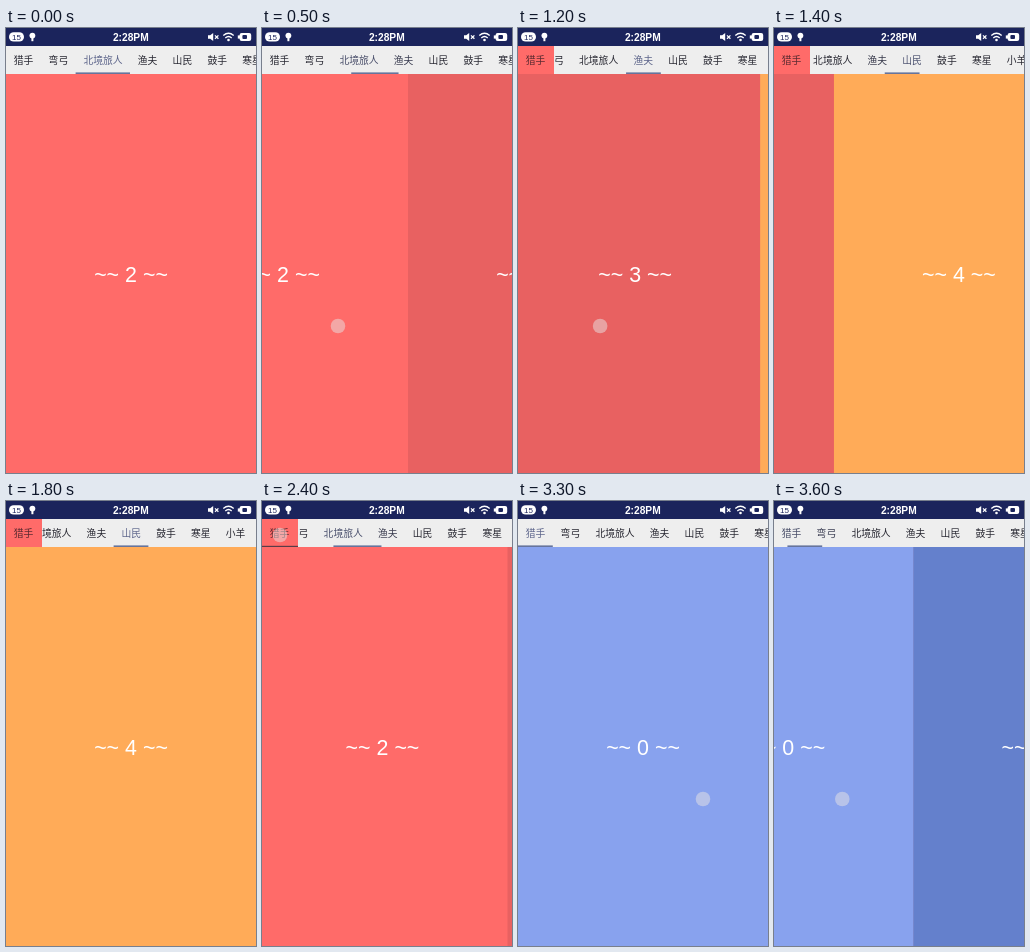
Animation of 250x445 px, one loop 3.7 s. Source, as an HTML page:

```html
<!DOCTYPE html>
<html lang="zh">
<head>
<meta charset="utf-8">
<title>Pinned tabs</title>
<style>
  html, body { margin: 0; width: 100%; height: 100%; overflow: hidden; background: #ff6b69; }
  svg { display: block; width: 100%; height: 100%; }
  text { text-anchor: middle; }
  .tab { font: 9.8px "Noto Sans CJK SC", "Noto Sans CJK", sans-serif; }
  .page { font: 21.4px "Liberation Sans", sans-serif; fill: #fff; }
  .clock { font: bold 10.2px "Liberation Sans", sans-serif; fill: #fff; }
  .badge { font: 8px "Liberation Sans", sans-serif; fill: #1b245c; }
  .line { fill: none; stroke: #fff; stroke-width: 1.3; }
</style>
</head>
<body>
<svg viewBox="0 0 250 445" preserveAspectRatio="none">
  <g id="pages"></g>
  <rect y="18" width="250" height="28" fill="#eee"/>
  <g id="strip"><rect id="bar" y="44.4" height="1.6" fill="#66749c"/></g>
  <g id="pin">
    <rect y="18" width="36" height="28" fill="#ff6b69"/>
    <text class="tab" x="17.6" y="35.6" fill="#5a2a30"></text>
    <rect id="press" y="44.8" width="36" height="1.2" fill="#5a3c48"/>
  </g>
  <rect width="250" height="18" fill="#1b245c"/>
  <rect x="3" y="4.2" width="15" height="9.4" rx="4.7" fill="#fff"/>
  <text class="badge" x="10.5" y="11.8">15</text>
  <circle cx="26.4" cy="7.6" r="2.9" fill="#fff"/>
  <path d="M25.4 9.6h2v3.6h-2z" fill="#fff"/>
  <text class="clock" x="124.8" y="12.7">2:28PM</text>
  <path d="M202 7.3h2.2l3-2.4v8.2l-3-2.4h-2.2z" fill="#fff"/>
  <path class="line" d="M209 7.4l3.4 3.4m0-3.4l-3.4 3.4"/>
  <path class="line" d="M217.3 7.6q5.2-4.6 10.4 0M219.3 9.9q3.2-2.8 6.4 0"/>
  <circle cx="222.5" cy="12" r="1.3" fill="#fff"/>
  <rect x="233.6" y="5" width="11.6" height="8" rx="2" fill="#fff"/>
  <path d="M231.8 7.4h3v3.2h-3z" fill="#fff"/>
  <rect x="236.4" y="7" width="4.6" height="4" rx="1" fill="#1b245c"/>
  <circle id="dot" r="7.3" fill="#e8e4e4" opacity=".5"/>
</svg>
<script>
const LOOP = 3700, STEP = 100, W = 250;
const REST = 94, SLOP = 6, FLING = 500;
const names = ["猎手", "弯弓", "北境旅人", "渔夫", "山民", "鼓手", "寒星", "小羊"];
const colors = ["#88a2ee", "#6480cc", "#ff6b69", "#e86161", "#ffab58"];

const swipes = [
  { down: 206, hold: 320, page: 2, x: 186 },
  { down: 1035, hold: 271, page: 3, x: 96 },
  { down: 3300, hold: 400, page: 0, x: 185 }
];
const tap = { down: 2280, hold: 160, x: 18, y: 34 };
const jump = { at: 2333.5, time: 520, from: 4 };

const $ = id => document.getElementById(id);
const lerp = (a, b, k) => a + (b - a) * k;
const easeOut = k => 1 - (1 - Math.min(1, k)) ** 5;
const isDown = (g, t) => t >= g.down && t < g.down + g.hold;
const show = (el, on) => { el.style.display = on ? "" : "none"; };

function add(parent, tag, attrs, text) {
  const el = document.createElementNS("http://www.w3.org/2000/svg", tag);
  for (const k in attrs) el.setAttribute(k, attrs[k]);
  if (text) el.textContent = text;
  return parent.appendChild(el);
}

// The finger rests briefly, then speeds up to the left
const travel = (s, t) => 110 * (Math.max(0, t - s.down - REST) / 200) ** 2;

// Pages follow the finger past the slop, then fling to the next one
function position(t) {
  const s = swipes.findLast(s => t >= s.down);
  if (!s) return swipes[0].page;
  if (t >= jump.at && s.down < jump.at)
    return jump.from * (1 - easeOut((t - jump.at) / jump.time));
  const up = s.down + s.hold;
  const drag = Math.max(0, travel(s, Math.min(t, up)) - SLOP) / W;
  return s.page + (t < up ? drag : lerp(drag, 1, easeOut((t - up) / FLING)));
}

function finger(t) {
  if (isDown(tap, t)) return [tap.x, tap.y];
  const s = swipes.find(s => isDown(s, t));
  return s && [s.x - travel(s, t), 298];
}

let edge = 0;
const tabs = names.map(name => {
  const w = name.length * 9.8 + 15.2, x = edge;
  edge += w;
  const el = add($("strip"), "text", { class: "tab", x: x + w / 2 + .2, y: 35.6 }, name);
  return { x, w, el };
});
$("pin").querySelector("text").textContent = names[0];

const pages = colors.map((fill, i) => {
  const g = add($("pages"), "g", {});
  add(g, "rect", { y: 46, width: W + .5, height: 399, fill });
  add(g, "text", { class: "page", x: 125, y: 254 }, `~~ ${i} ~~`);
  return g;
});

// Left edge and width of the tab at a fractional position
function span(p) {
  const i = Math.floor(p), a = tabs[i], b = tabs[i + 1];
  return [lerp(a.x, b.x, p - i), lerp(a.w, b.w, p - i)];
}

function draw(t) {
  const p = position(t);
  pages.forEach((g, i) => g.setAttribute("transform", `translate(${(i - p) * W})`));

  // The underline and the tab strip trail the pages slightly
  const q = position(t - 13), [x, w] = span(q);
  $("bar").setAttribute("x", x);
  $("bar").setAttribute("width", w);
  tabs.forEach((tab, i) => {
    const k = Math.max(0, 1 - Math.abs(i - q));
    tab.el.setAttribute("fill", `rgb(${lerp(38, 92, k)},${lerp(38, 100, k)},${lerp(48, 138, k)})`);
  });

  const [sx, sw] = span(position(t - 37));
  const scroll = Math.max(0, sx + sw / 2 - W / 2);
  $("strip").setAttribute("transform", `translate(${-scroll})`);
  show($("pin"), scroll > .3);
  show($("press"), isDown(tap, t));

  const at = finger(t);
  show($("dot"), at);
  if (at) $("dot").setAttribute("transform", `translate(${at})`);
}

const start = performance.now();
function tick() {
  const t = (performance.now() - start) % LOOP;
  draw(Math.floor(t / STEP) * STEP);
  requestAnimationFrame(tick);
}
tick();
</script>
</body>
</html>
```
